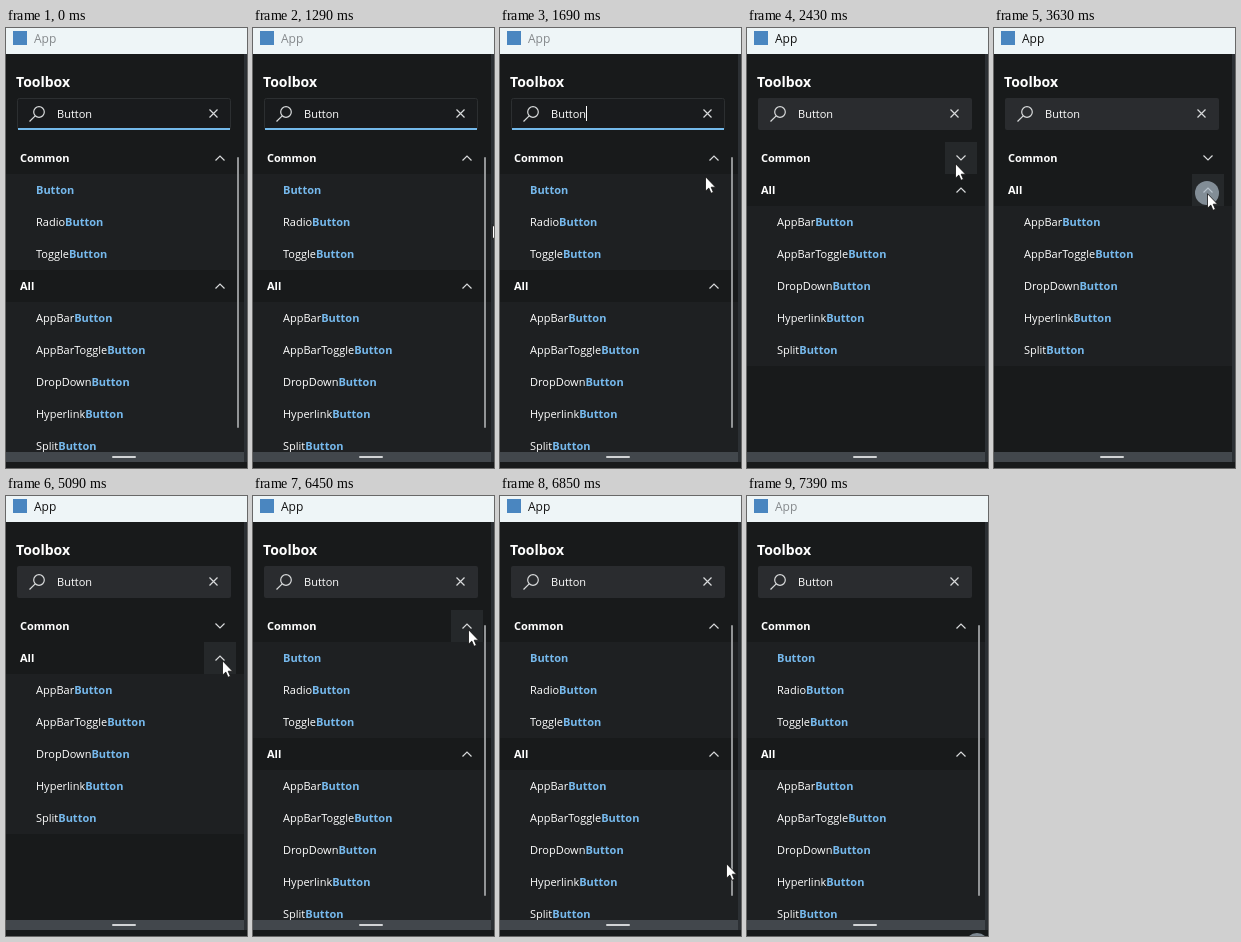
An HTML page for the animation above (7590 ms loop, 241 by 440 pixels).

```html
<!DOCTYPE html>
<html lang="en">
<head>
<meta charset="utf-8">
<title>Toolbox</title>
<style>
  html, body { margin: 0; width: 100%; height: 100%; overflow: hidden; background: #181a1b; }
  svg { display: block; width: 241px; height: 440px; }
  text { font: 400 11px "Open Sans", "Noto Sans", sans-serif; fill: #fff; }
  .head { font-weight: 700; }
  .hit { font-weight: 700; fill: #76b9ed; }
  .line { fill: none; stroke: #d8dadb; stroke-width: 1.2; }
</style>
</head>
<body>
<svg id="stage" viewBox="0 0 241 440" xmlns="http://www.w3.org/2000/svg">
  <rect width="241" height="440" fill="#181a1b"/>
  <rect width="241" height="26" fill="#eef5f7"/>
  <rect x="7" y="3" width="14" height="14" fill="#4a86c0"/>
  <text id="app" x="28" y="15" style="font-size:12px">App</text>

  <text class="head" x="10" y="59" style="font-size:14px">Toolbox</text>
  <rect id="blurBox" x="11" y="70" width="214" height="32" rx="2" fill="#2a2c2f"/>
  <g id="focusBox">
    <rect x="11.5" y="70.5" width="213" height="31" rx="2" fill="#191b1d" stroke="#2c2f31"/>
    <path d="M12 101H224" stroke="#74b9ea" stroke-width="2"/>
  </g>
  <g class="line">
    <circle cx="33" cy="84" r="5.3"/>
    <path d="M29.2 87.8L23.5 93.5"/>
    <path d="M203.5 81.5l8 8m0-8l-8 8"/>
  </g>
  <text x="51" y="90">Button</text>
  <path id="caret" d="M86.5 78V93" stroke="#fff"/>

  <g id="common"></g>
  <g id="all"></g>
  <rect id="scroll" x="231" y="129" width="2" height="271" rx="1" fill="#929496"/>

  <rect x="238" y="26" width="3" height="408" fill="#2c3034"/>
  <rect id="grip" y="424" width="238" height="10" fill="#42474c"/>
  <rect x="106" y="428" width="24" height="2" rx="1" fill="#d2d4d6"/>
  <rect y="434" width="241" height="6" fill="#181a1b"/>

  <circle id="press" r="12" fill="#a9b8c4" opacity=".7"/>
  <path id="mouse" d="M.5 .7V15.2L3.8 12.1L6 17.3L8.4 16.3L6.2 11.2H10.6Z"
        fill="#fff" stroke="#111" stroke-width=".8"/>
</svg>
<script>
const LOOP = 7590;
const $ = id => document.getElementById(id);

// Group origin is the top of its 32px header.
function buildGroup(id, title, names) {
  const rows = names.map((name, i) =>
    `<text x="30" y="${52 + 32 * i}">${name}<tspan class="hit">Button</tspan></text>`).join("");
  const h = id === "all" ? 160 : 32 * names.length;
  $(id).innerHTML = `
    <rect class="hover" x="198" y="0" width="32" height="32" fill="#25282a"/>
    <text class="head" x="14" y="20">${title}</text>
    <path class="line chev"/>
    <g class="items"><rect y="32" width="238" height="${h}" fill="#1e2022"/>${rows}</g>`;
}
buildGroup("common", "Common", ["", "Radio", "Toggle"]);
buildGroup("all", "All", ["AppBar", "AppBarToggle", "DropDown", "Hyperlink", "Split"]);

const smooth = p => p * p * (3 - 2 * p);
const easeOut = p => 1 - (1 - p) * (1 - p);

// start, end, from, to, easing
const moves = [
  [1270, 1690, [242, 201], [205, 148], easeOut],
  [1690, 2040, [205, 148], [208, 135], easeOut],
  [2830, 3130, [208, 135], [213, 165], smooth],
  [4040, 4170, [213, 165], [213, 178], smooth],
  [4300, 4460, [213, 178], [216, 165], smooth],
  [5060, 5390, [216, 165], [215, 132], smooth],
  [6430, 7060, [215, 132], [230, 449], smooth]
];
const presses = [[2200, 2380], [3630, 3730], [4710, 4820], [5870, 5980], [7370, LOOP]];

const within = (t, [a, b]) => t >= a && t < b;

function mouseAt(t) {
  let pos = [260, 201];
  for (const [a, b, from, to, ease] of moves) {
    if (t < a) break;
    const k = ease(Math.min(1, (t - a) / (b - a)));
    pos = from.map((v, i) => Math.round(v + (to[i] - v) * k));
  }
  return pos;
}

const show = (el, on) => el.style.display = on ? "" : "none";

function drawGroup(id, top, open, [x, y]) {
  const g = $(id);
  g.setAttribute("transform", `translate(0 ${top})`);
  show(g.querySelector(".items"), open);
  show(g.querySelector(".hover"), x >= 198 && x < 230 && y >= top && y < top + 32);
  g.querySelector(".chev").setAttribute("d",
    open ? "M209.5 18.5L214 14L218.5 18.5" : "M209.5 13.5L214 18L218.5 13.5");
}

function draw(t) {
  const pos = mouseAt(t);
  const focused = t < 2240;
  const commonOpen = !within(t, [2400, 5980]);
  const allOpen = !within(t, [3730, 4820]);

  $("app").style.fill = within(t, [2200, 7380]) ? "#111" : "#85898c";
  show($("focusBox"), focused);
  show($("blurBox"), !focused);
  show($("caret"), within(t, [430, 940]) || within(t, [1450, 1960]));

  drawGroup("common", 114, commonOpen, pos);
  drawGroup("all", commonOpen ? 242 : 146, allOpen, pos);
  show($("scroll"), commonOpen);
  $("grip").setAttribute("fill", within(pos[1], [424, 434]) ? "#555b61" : "#42474c");

  const at = `translate(${pos})`;
  $("mouse").setAttribute("transform", at);
  $("press").setAttribute("transform", at);
  show($("press"), presses.some(p => within(t, p)));
}

let start;
function tick(now) {
  start ??= now;
  draw((now - start) % LOOP);
  requestAnimationFrame(tick);
}
draw(0);
requestAnimationFrame(tick);
</script>
</body>
</html>
```
